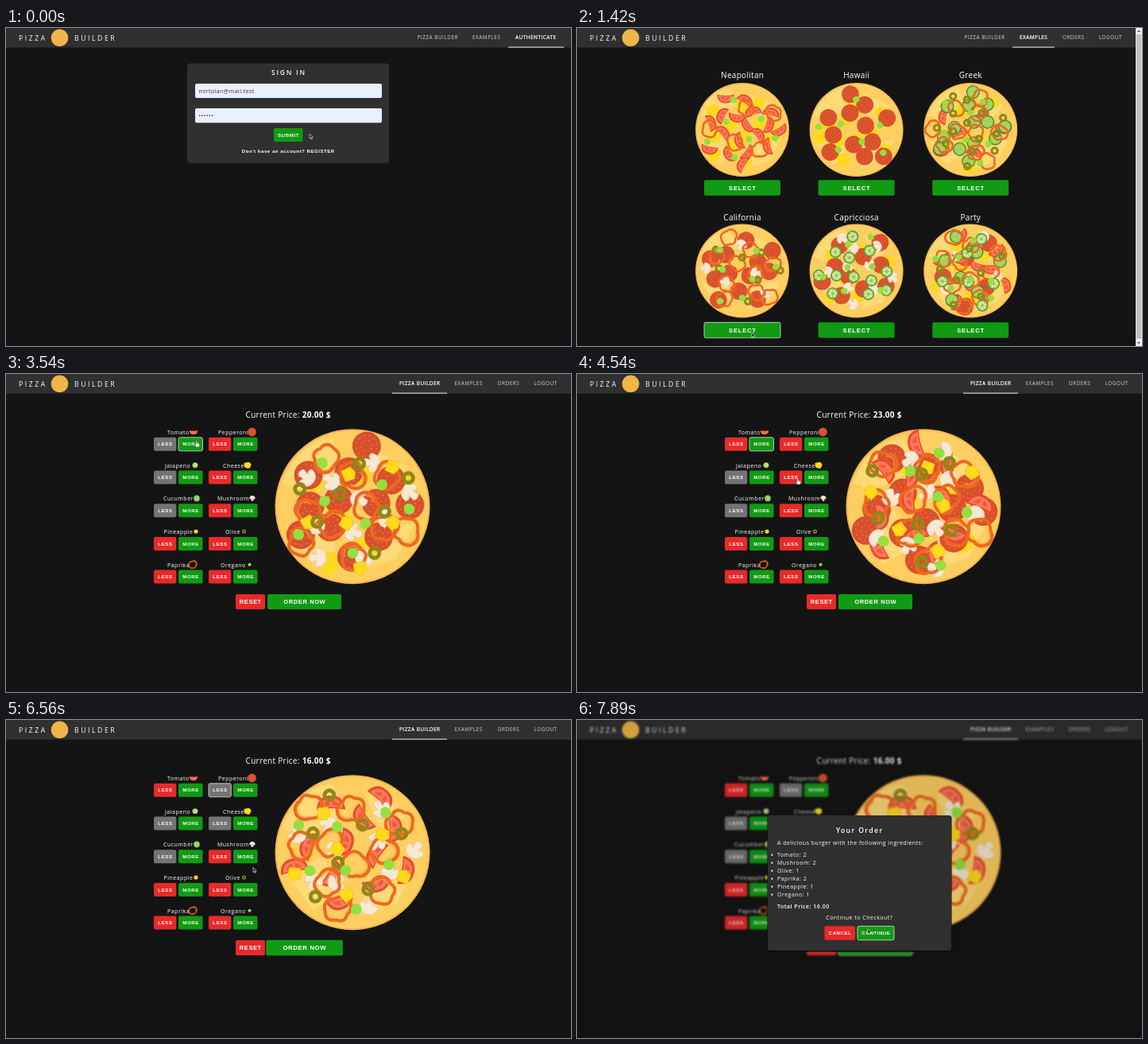
An HTML page that plays this animation: 711x400 px, repeating every 7980 ms.

```html
<!DOCTYPE html>
<html lang="en">
<head>
<meta charset="utf-8">
<title>Pizza Builder</title>
<style>
  html, body { margin: 0; width: 100%; height: 100%; overflow: hidden; background: #111; }
  svg { display: block; width: 711px; height: 400px; }
  text { font-family: "Open Sans", "Noto Sans", sans-serif; fill: #fff; white-space: pre; }
  .b { font-family: "Liberation Sans", Arial, sans-serif; font-weight: 700; }
  .mid { text-anchor: middle; }
  .semi { font-weight: 600; }
  .dim { fill: #d0d0d0; }
  .on { stroke: #fff; stroke-width: .22; }
  .ink { fill: #333; }
  .back { filter: blur(1px) brightness(.88); }
</style>
</head>
<body>
<svg viewBox="0 0 711 400" xmlns="http://www.w3.org/2000/svg">
  <defs>
    <g id="tomato">
      <path d="M-18-7Q0-3 18-7Q17 11 0 11T-18-7Z" fill="#e84a2c"/>
      <path d="M-15-5Q0-2 15-5Q13 8 0 8T-15-5Z" fill="#ff7a5c"/>
      <path d="M-10-2Q-6 5-2 5L-2-1ZM10-2Q6 5 2 5L2-1Z" fill="#f2593a"/>
    </g>
    <g id="pepperoni">
      <circle r="18" fill="#d9502c"/>
      <circle r="13" fill="none" stroke="#f08a5e" stroke-width="1.4" stroke-dasharray="1.4 5.4"/>
      <circle r="7" fill="none" stroke="#f08a5e" stroke-width="1.4" stroke-dasharray="1.4 4"/>
    </g>
    <g id="jalapeno">
      <circle r="11" fill="#d8e69a" stroke="#55a532" stroke-width="3"/>
      <path d="M0-9V9M-8-4L8 4M-8 4L8-4" stroke="#86bd45" stroke-width="1.5"/>
      <circle r="5" fill="none" stroke="#fff5cf" stroke-width="2" stroke-dasharray="2 3.2"/>
    </g>
    <path id="cheese" d="M-15-9L3-13Q15-10 15 0L9 13Q-6 15-14 7Z" fill="#ffd91f"/>
    <g id="cucumber">
      <circle r="13" fill="#a3d057" stroke="#2f8539" stroke-width="2"/>
      <circle r="6" fill="none" stroke="#c9e58a" stroke-width="2" stroke-dasharray="2 3"/>
    </g>
    <path id="mushroom" d="M-12 1Q-11-11 0-11T12 1Q8 5 4 1L5 9Q0 13-5 9L-4 1Q-8 5-12 1Z" fill="#f8e8d2" stroke="#e2c9a6" stroke-width=".8"/>
    <path id="pineapple" d="M-8-6L6-8L9 4L1 9L-7 6Z" fill="#ffdb1c" stroke="#f5bf16" stroke-width=".8"/>
    <circle id="olive" r="6" fill="none" stroke="#8d8a17" stroke-width="5"/>
    <g id="paprika" fill="none">
      <path id="ring" d="M-3-14Q8-20 15-11Q21-1 12 7Q10 18-2 14Q-15 17-16 4Q-21-12-3-14Z" stroke="#ef6820" stroke-width="3.4"/>
      <use href="#ring" transform="scale(.95)" style="stroke:#ff9a3c"/>
      <path d="M-2-11Q7-16 12-8Q17-1 9 5" stroke="#ffa64a" stroke-width="1"/>
    </g>
    <path id="oregano" d="M-7 1Q-6-7 1-7Q8-6 7 1Q5 8-1 6Q-5 7-7 1Z" fill="#95df3f"/>
  </defs>
  <g id="stage"></g>
</svg>
<script>
const LOOP = 7980;
const GREEN = '#119a13', RED = '#e82a2a', GREY = '#747474', PANEL = '#303030';
const stage = document.getElementById('stage');

// Moments at which the picture is refreshed
const SLOW = { 1300: 120, 2920: 120, 4540: 120, 6860: 110, 7270: 120 };
const ticks = [];
for (let t = 0; t < LOOP; t += SLOW[t] || 100) ticks.push(t);

const KINDS = ['Tomato', 'Pepperoni', 'Jalapeno', 'Cheese', 'Cucumber',
  'Mushroom', 'Pineapple', 'Olive', 'Paprika', 'Oregano'];
const LABEL_X = [203, 267, 200, 273, 198, 266, 198.5, 276, 203, 270];
const ICON_X = [236, 309.5, 238, 304, 240, 310, 239, 299.5, 235, 306.5];
const PIECES = [6, 2.4, 6, 6, 7, 5, 6, 7, 5, 7];
const LAYERS = [3, 1, 0, 4, 5, 8, 2, 6, 7, 9];

// Amount of each kind, one digit per entry of KINDS
const EXAMPLES = [
  ['Neapolitan', '3002000011'], ['Hawaii', '0502000001'], ['Greek', '1001200221'],
  ['California', '0500010121'], ['Capricciosa', '0421020001'], ['Party', '2211110121']
];
const STATES = [
  [1520, '16.75', '0500010121'], [1920, '17.50', '0501010121'],
  [2220, '19.00', '0501020121'], [2820, '20.00', '0501021121'],
  [3640, '21.50', '1501021121'], [3840, '23.00', '2501021121'],
  [4960, '22.25', '2500021121'], [5760, '21.00', '2400021121'],
  [5960, '19.75', '2300021121'], [6160, '18.50', '2200021121'],
  [6360, '17.25', '2100021121'], [6460, '16.00', '2000021121']
];
const FOCUS = [[1520, ''], [1920, '3M'], [2220, '5M'], [2820, '6M'], [3440, '0M'],
  [4960, '3L'], [5760, '1L'], [6660, 'order']];
// time, x, y, hand
const CURSOR = [
  [0, 382, 133, 0], [200, 360, 135, 1], [500, 360, 135, 0], [900, 300, 300, 0],
  [1300, 220, 383, 0], [1520, 220, 383, 0], [1720, 300, 150, 0], [1900, 300, 131, 1],
  [2000, 300, 131, 1], [2200, 300, 172, 1], [2420, 300, 172, 0], [2720, 239, 213, 1],
  [2920, 239, 213, 0], [3440, 239, 84, 1], [4040, 239, 84, 0], [4500, 277, 131, 1],
  [5160, 277, 131, 0], [5600, 268, 83, 1], [6460, 268, 83, 0], [6660, 354, 288, 0],
  [7270, 354, 288, 0], [7790, 366, 263, 0]
];

const last = (list, t) => list.filter(e => e[0] <= t).pop();

function random(seed) {
  let s = seed * 7919 + 17;
  return () => (s = (s * 16807) % 2147483647) / 2147483647;
}

const rect = (x, y, w, h, fill, rx = 0, line = '') =>
  `<rect x="${x}" y="${y}" width="${w}" height="${h}" rx="${rx}" fill="${fill}"` +
  (line ? ` stroke="${line}" stroke-width=".8"` : '') + '/>';

function text(x, y, s, size = 7, gap = .5, cls = '') {
  const left = cls.includes('mid') ? x + gap / 2 : x;
  return `<text x="${left}" y="${y}" font-size="${size}" letter-spacing="${gap}" class="${cls}">${s}</text>`;
}

const button = (x, y, w, h, s, fill, size = 6, gap = .65, focus = false) =>
  rect(x, y, w, h, fill, 2, focus ? '#d5e8d5' : '') +
  text(x + w / 2, y + h / 2 + size * .36, s, size, gap, 'b mid');

const use = (kind, x, y, scale, turn = 0) =>
  `<use href="#${KINDS[kind].toLowerCase()}" transform="translate(${x.toFixed(1)} ${y.toFixed(1)}) rotate(${turn | 0}) scale(${scale})"/>`;

function pizza(x, y, radius, counts, seed) {
  const rnd = random(seed);
  let out = '<circle r="97.5" fill="#f3b751"/><circle r="95.5" fill="#ffce60"/>' +
    '<path d="M-88-30Q-70-80-25-86L-8-50L-60-20ZM-85 25L-35 5L-20 55L-50 72ZM15-75L70-50L40-20ZM20 30L80 20L55 65L10 80Z" fill="#ffda77"/>';
  for (const kind of LAYERS) {
    const n = Math.round(counts[kind] * PIECES[kind]);
    const phase = rnd() * 6.28;
    for (let i = 0; i < n; i++) {
      const r = 80 * Math.sqrt((i + .25 + rnd() * .6) / n);
      const a = phase + i * 2.4 + (rnd() - .5) * .5;
      out += use(kind, r * Math.cos(a), r * Math.sin(a), 1, rnd() * 360);
    }
  }
  return `<g transform="translate(${x} ${y}) scale(${radius / 97.5})">${out}</g>`;
}

function nav(items, active, shift = 0) {
  const [, from, width] = items[active];
  return rect(-9, -9, 730, 33.5, PANEL) +
    text(16, 15.6, 'PIZZA', 8.6, 2.6) + text(86, 15.6, 'BUILDER', 8.6, 2.6) +
    '<circle cx="67.5" cy="12.3" r="10.8" fill="#eeb548"/>' +
    items.map(([s, x], i) => text(x - shift, 14.4, s, 6.4, .52, i === active ? 'on' : 'dim')).join('') +
    rect(from - shift - 9, 23.6, width + 18, 1, '#f4f4f4');
}

const GUEST = [['PIZZA BUILDER', 517.5, 51], ['EXAMPLES', 587, 35], ['AUTHENTICATE', 641, 52]];
const MEMBER = [['PIZZA BUILDER', 495, 51], ['EXAMPLES', 564.5, 35], ['ORDERS', 618.5, 26], ['LOGOUT', 664.5, 28]];

function signIn() {
  return nav(GUEST, 2) + rect(228, 44.5, 254, 125.5, PANEL, 4) +
    text(355, 59, 'SIGN IN', 8.4, 1.8, 'mid semi') +
    rect(238, 70, 235, 18, '#e8f0fe', 2) + text(242.5, 82, 'mirtolan@mail.test', 7.2, .35, 'ink') +
    rect(238, 101, 235, 18.3, '#e8f0fe', 2) + text(242.5, 113, '••••••', 7.2, .45, 'ink') +
    button(337, 126, 36.5, 17, 'SUBMIT', GREEN, 6.2, .6) +
    text(355, 156.5, 'Don\'t have an account? REGISTER', 6.1, .5, 'b mid');
}

function examples(t) {
  const cards = EXAMPLES.map(([name, counts], i) => {
    const x = 208 + (i % 3) * 143.6, y = i < 3 ? 0 : 179;
    return text(x, y + 62.5, name, 10, .3, 'mid') +
      pizza(x, i < 3 ? 128 : 305.5, 59, counts, i + 3) +
      button(x - 48, y + 191.3, 96, 19.5, 'SELECT', GREEN, 7.6, .8, i === 3 && t >= 1400);
  });
  return nav(MEMBER, 1, 7.6) + cards.join('') +
    rect(703, 0, 8, 400, '#f1f1f1') + rect(703.7, 8, 6.6, 383, '#c1c1c1') +
    '<path d="M705 5L707 2.5L709 5ZM705 395L707 397.5L709 395Z" fill="#555"/>';
}

function builder(t) {
  const state = last(STATES, t), [since, price, counts] = state;
  const focus = last(FOCUS, t)[1];
  const rows = KINDS.map((name, i) => {
    const right = i % 2, y = (i >> 1) * 41.7;
    const x = right ? 255 : 186;
    return text(LABEL_X[i], y + 76, name) + use(i, ICON_X[i], y + 73, .3) +
      button(x, y + 79.8, 28.3, 17, 'LESS', +counts[i] ? RED : GREY, 6, .65, focus === i + 'L') +
      button(x + 31, y + 79.8, 30.5, 17, 'MORE', GREEN, 6, .65, focus === i + 'M');
  });
  const p = Math.min(1, (t - since) / 300);
  const pulse = since > 1520 ? 1 + .045 * Math.sin(Math.PI * p) : 1;
  return nav(MEMBER, 0) +
    text(355, 55, `Current Price: <tspan font-weight="700">${price} $</tspan>`, 10, .3, 'mid') +
    rows.join('') + pizza(436, 166.7, 97.5, counts, 20 + STATES.indexOf(state)) +
    button(289, 277, 37, 19, 'RESET', RED, 7.5, .6) +
    `<g transform="translate(375.5 286.5) scale(${pulse})">` +
    button(-46.5, -9.5, 93, 19, 'ORDER NOW', GREEN, 7.5, .6, focus === 'order') + '</g>';
}

function modal(t) {
  const p = Math.min(1, (t - 6751) / 400);
  const ease = 1 - (1 - p) ** 2;
  const list = KINDS.map((k, i) => [k, last(STATES, t)[2][i]]).filter(e => +e[1]);
  const order = ['Tomato', 'Mushroom', 'Olive', 'Paprika', 'Pineapple', 'Oregano'];
  list.sort((a, b) => order.indexOf(a[0]) - order.indexOf(b[0]));
  return `<g transform="translate(0 ${-400 * (1 - ease)})" opacity="${Math.min(1, ease * 1.08)}">` +
    rect(239.5, 120.5, 232, 171, '#090909', 3) + rect(240, 120, 231, 170, PANEL, 3) +
    text(355, 142, 'Your Order', 8.6, 1.4, 'mid semi') +
    text(252, 157, 'A delicious burger with the following ingredients:') +
    list.map(([k, n], i) => `<circle cx="245.5" cy="${169.7 + i * 10}" r="1.1" fill="#fff"/>` +
      text(252, 172 + i * 10, `${k}: ${n}`)).join('') +
    text(252, 236.5, 'Total Price: 16.00', 7, .5, 'semi') +
    text(355, 251.2, 'Continue to Checkout?', 7, .5, 'mid') +
    button(311.5, 259.3, 38.5, 17.5, 'CANCEL', RED, 6, .6) +
    button(353, 259.3, 46, 17.5, 'CONTINUE', GREEN, 6, .6, t >= 7790) + '</g>';
}

function cursor(t) {
  const a = last(CURSOR, t), b = CURSOR[CURSOR.indexOf(a) + 1] || a;
  const k = b === a ? 0 : (t - a[0]) / (b[0] - a[0]);
  const x = a[1] + (b[1] - a[1]) * k, y = a[2] + (b[2] - a[2]) * k;
  const shape = a[3]
    ? '<path d="M0 0Q1-1 1.6 0V3L4 3.6Q5 4 4.6 6L4 8H.4L-1.6 5.2Q-1.6 4 0 4.6Z" fill="#fff" stroke="#222" stroke-width=".5"/>'
    : '<path d="M0 0V6L1.4 4.8L2.4 7L3.4 6.5L2.5 4.4H4.2Z" fill="#111" stroke="#fff" stroke-width=".6"/>';
  return `<g transform="translate(${x} ${y})">${shape}</g>`;
}

function draw(t) {
  const page = t < 500 ? signIn() : t < 1520 ? examples(t) : builder(t);
  const open = t >= 6760;
  stage.innerHTML = `<g class="${open ? 'back' : ''}">` + rect(-9, -9, 730, 420, '#141414') + page + '</g>' +
    (open ? modal(t) : '') + cursor(t);
}

let shown = -1;
function frame(now) {
  const t = now % LOOP;
  const tick = ticks.filter(v => v <= t).pop();
  if (tick !== shown) draw(shown = tick);
  requestAnimationFrame(() => frame(performance.now()));
}
frame(0);
</script>
</body>
</html>
```
